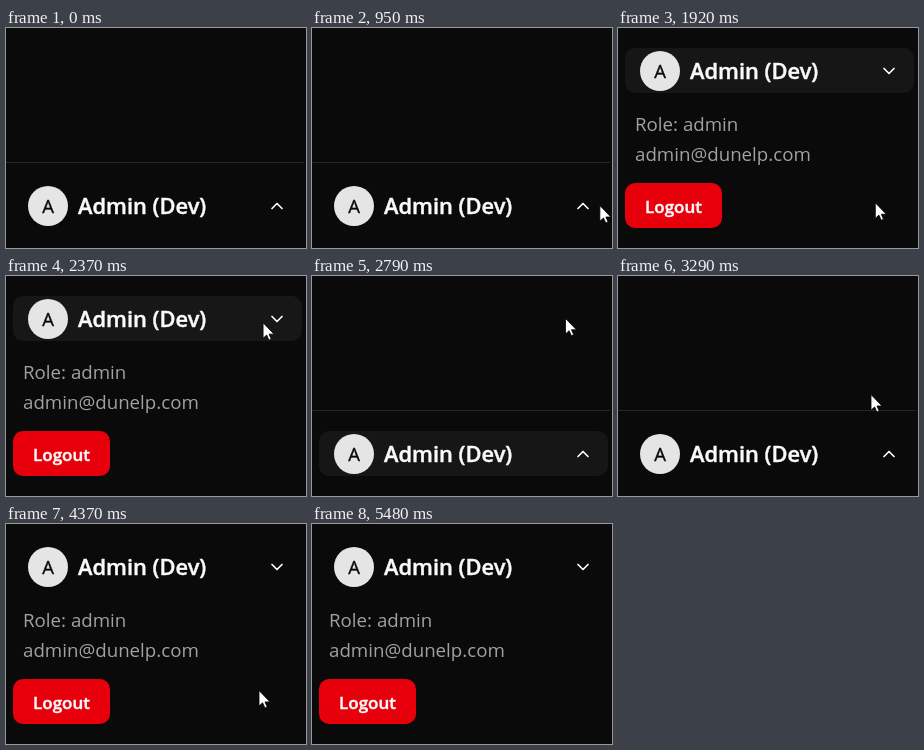
An HTML page for the animation above (5.85 s loop, 300 px wide and 220 px high).

```html
<!DOCTYPE html>
<html lang="en">
<head>
<meta charset="utf-8">
<title>Account menu</title>
<style>
  html, body { margin: 0; width: 100%; height: 100%; overflow: hidden; background: #0a0a0a; }
  svg { display: block; width: 300px; height: 220px; font-family: "Open Sans", "Noto Sans", sans-serif; }
  .semi { font-weight: 600; fill: #fafafa; stroke: #fafafa; stroke-width: .45; }
  .muted { font-size: 18.7px; fill: #a1a1a1; }
</style>
</head>
<body>
<svg viewBox="0 0 300 220">
  <g id="header">
    <path d="M0 134.5H298" stroke="#262626"/>
    <rect id="hover" x="7" y="155" width="289" height="45" rx="10" fill="#171717"/>
    <circle cx="42" cy="178" r="20" fill="#e5e5e5"/>
    <text x="42" y="185" font-size="18.5" text-anchor="middle" fill="#0a0a0a" stroke="#0a0a0a" stroke-width=".35">A</text>
    <text class="semi" x="72" y="186" font-size="21.85">Admin (Dev)</text>
    <path id="chevron" fill="none" stroke="#fafafa" stroke-width="1.7" stroke-linecap="round" stroke-linejoin="round"/>
  </g>
  <g id="details">
    <text class="muted" x="17" y="103">Role: admin</text>
    <text class="muted" x="17" y="133">admin@dunelp.com</text>
    <rect x="7" y="155" width="97" height="45" rx="10" fill="#e7000b"/>
    <text class="semi" x="55.5" y="185" font-size="17" text-anchor="middle">Logout</text>
  </g>
  <g id="pointer">
    <path d="M0 0V15.6L3.6 12.3L5.9 17.4L8.2 16.4L6 11.4H11Z" fill="#fff" stroke="#000" stroke-width=".8"/>
    <circle id="click" r="15" fill="#ff0" fill-opacity=".5"/>
  </g>
</svg>
<script>
const LOOP = 5850, STEP = 50, FADE = 150, HOLD = 100;
const $ = id => document.getElementById(id);
const [header, hover, chevron, details, pointer, click] =
  ['header', 'hover', 'chevron', 'details', 'pointer', 'click'].map($);

const easeIn = k => k * k;
const easeOut = k => 1 - (1 - k) ** 2;
const easeBoth = k => k ** 3 * (k * (6 * k - 15) + 10);

// Each stroke carries the pointer on from where the last one ended.
const entry = { x: 309, y: 179 };
const strokes = [
  { start: 850, end: 1300, x: 255.5, y: 175.5, ease: easeOut },
  { start: 1870, end: 2470, x: 253.5, y: 42, ease: easeBoth, bend: 7 },
  { start: 2740, end: 3340, x: 253, y: 119, ease: easeBoth },
  { start: 3360, end: 3710, x: 253, y: 152, ease: easeOut },
  { start: 3820, end: 3970, x: 253, y: 166.5, ease: easeOut },
  { start: 5180, end: 5480, x: 263, y: 223, ease: easeIn },
];
const clicks = [1450, 2540, 3970];
const toggles = [1720, 2790, 4220];
// Times at which the row highlight turns on, off, on, ...
const hovers = [950, 1920, 2220, 2790, 3870, 4220];

const countPast = (times, t) => times.filter(s => s <= t).length;
const mix = (a, b, k) => a + (b - a) * k;

// The pointer moves in steps, as in a screen recording.
function pointerAt(t) {
  const i = strokes.findLastIndex(s => s.start <= t);
  if (i < 0) return entry;
  const { start, end, x, y, ease, bend = 0 } = strokes[i];
  const from = strokes[i - 1] ?? entry;
  const elapsed = Math.floor((t - start) / STEP) * STEP;
  const k = Math.min(1, elapsed / (end - start));
  return {
    x: mix(from.x, x, ease(k)) + bend * Math.sin(Math.PI * k),
    y: mix(from.y, y, ease(k)),
  };
}

function hoverAt(t) {
  const n = countPast(hovers, t);
  if (!n) return 0;
  const k = Math.min(1, (t - hovers[n - 1]) / FADE);
  return n % 2 ? k : 1 - k;
}

function draw(t) {
  const open = countPast(toggles, t) % 2 === 1;
  header.setAttribute('transform', `translate(0 ${open ? -135 : 0})`);
  chevron.setAttribute('d', open ? 'M266 175.5l5 5l5 -5' : 'M266 180.5l5 -5l5 5');
  details.style.display = open ? '' : 'none';
  hover.style.opacity = hoverAt(t);

  const { x, y } = pointerAt(t);
  pointer.setAttribute('transform', `translate(${x} ${y})`);
  click.style.display = clicks.some(c => t >= c && t < c + HOLD) ? '' : 'none';
}

const begin = performance.now();
function tick() {
  draw((performance.now() - begin) % LOOP);
  requestAnimationFrame(tick);
}
tick();
</script>
</body>
</html>
```
